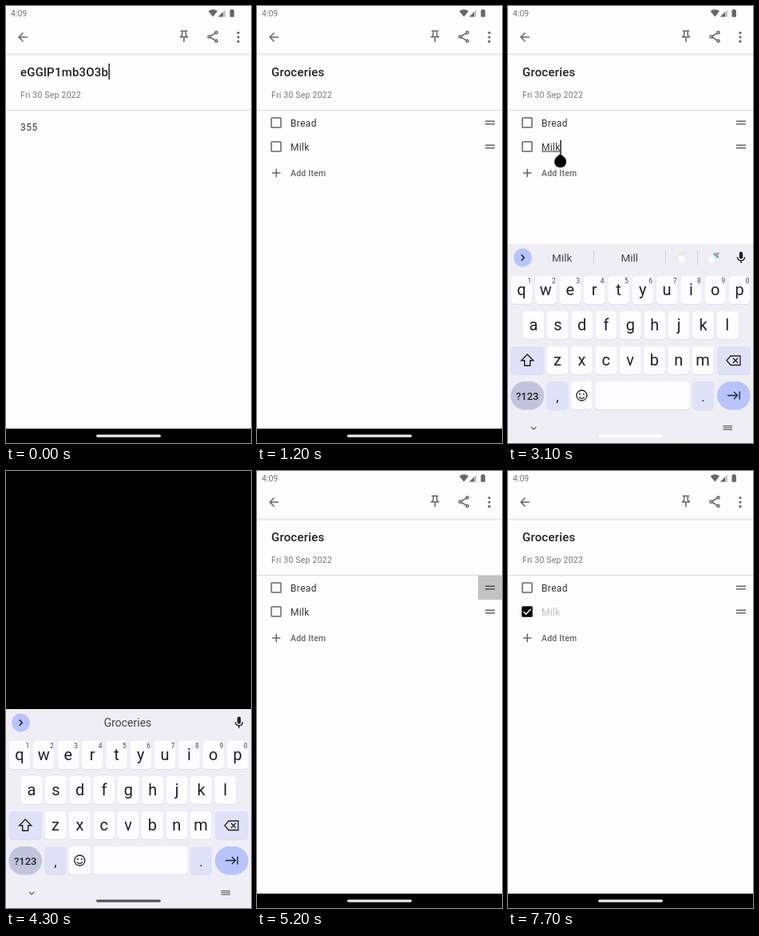
These frames come from a looping animation (307 by 547 pixels, 8 s). An HTML page:

```html
<!DOCTYPE html>
<html lang="en">
<head>
<meta charset="utf-8">
<title>Notes app walkthrough</title>
<style>
html, body { margin: 0; width: 100%; height: 100%; overflow: hidden; background: #000 }
svg { display: block; width: 307px; height: 547px; font-family: Roboto, sans-serif }
text { white-space: pre }
</style>
</head>
<body>
<svg id="stage" viewBox="0 0 307 547"></svg>
<script>
const stage = document.getElementById('stage');
const GREY = '#666', INK = '#333', PAPER = '#fdfdfd';
const KEYBOARD = '#f0eef5', KEY = '#fdfcff', TINT = '#dfe1f9', ACCENT = '#b6c4ff';

// Drawing helpers
const rect = (x, y, w, h, fill, r = 0, more = '') =>
  `<rect x="${x}" y="${y}" width="${w}" height="${h}" rx="${r}" fill="${fill}" ${more}/>`;
const circle = (x, y, r, fill, more = '') =>
  `<circle cx="${x}" cy="${y}" r="${r}" fill="${fill}" ${more}/>`;
const line = (d, stroke = GREY, width = 1.5) =>
  `<path d="${d}" fill="none" stroke="${stroke}" stroke-width="${width}"/>`;
const shape = (d, fill = GREY) => `<path d="${d}" fill="${fill}"/>`;
const text = (s, x, y, size, fill, { weight = 400, gap = 0, mid = false } = {}) =>
  `<text x="${x}" y="${y}" font-size="${size}" fill="${fill}" font-weight="${weight}"
    letter-spacing="${gap}" text-anchor="${mid ? 'middle' : 'start'}">${s}</text>`;
const at = (x, y, body, scale = 1) => `<g transform="translate(${x} ${y}) scale(${scale})">${body}</g>`;
// Icons use a 24 unit box centred on x, y
const icon = (x, y, body, scale = .747) => at(x - 12 * scale, y - 12 * scale, body, scale);
const ripple = (x, y) => circle(x, y, 15, '#000', 'opacity=".2"');
const pill = color => rect(113, 536.4, 81, 3.4, color, 1.7);

const backIcon = icon(21, 39, shape('M20 11H7.83l5.59-5.59L12 4l-8 8 8 8 1.41-1.41L7.83 13H20z'));
const pinIcon = icon(223, 38, shape('M14 4v5c0 1.12.37 2.16 1 3H9c.65-.86 1-1.9 1-3V4h4m3-2H7a1 1 0 0 0 0 2h1v5c0 1.66-1.34 3-3 3v2h5.97v7l1 1 1-1v-7H19v-2c-1.66 0-3-1.34-3-3V4h1a1 1 0 0 0 0-2z'));
const shareIcon = icon(259, 38.5, line('M8 11l8-5M8 13l8 5', GREY, 2) +
  [[18, 5], [6, 12], [18, 19]].map(([x, y]) => circle(x, y, 2.1, 'none', `stroke="${GREY}" stroke-width="2"`)).join(''));
const moreIcon = [33.6, 39, 44.4].map(y => circle(291, y, 1.6, GREY)).join('');

function statusBar() {
  return text('4:09', 6, 13.3, 10.5, '#757575') +
    shape('M253.6 6.6Q259.3 2 265 6.6L259.3 13.6z') +
    shape('M275 4.5v9h-9z', '#c4c4c4') + shape('M272 7.5v6h-6z') +
    rect(280.5, 5, 5.4, 8.7, GREY, .8) + rect(282, 4, 2.4, 1.5, GREY);
}

function page(toolbar) {
  return rect(0, 0, 307, 530, PAPER) + statusBar() + toolbar +
    rect(0, 59.5, 307, 1.2, '#e2e2e2') + rect(0, 60.7, 307, 1.3, '#f1f1f1');
}

function checkbox(x, y, on) {
  return on
    ? rect(x - 6.8, y - 6.8, 13.6, 13.6, '#000', 1.5) + line(`M${x - 4.4} ${y + .2}l3 3 6-6.4`, '#fff')
    : rect(x - 6, y - 6, 12, 12, 'none', .8, `stroke="${GREY}" stroke-width="1.5"`);
}

function item(label, y, on) {
  return checkbox(24, y, on) + text(label, 42, y + 5, 12, on ? '#bbb' : INK, { gap: .35 }) +
    line(`M286 ${y - 1.8}h12M286 ${y + 1.8}h12`);
}

function cursor(x, y, h) { return rect(x - .75, y, 1.5, h, '#222'); }

function dropHandle(x, y, alpha) {
  return `<g opacity="${alpha}">${shape(`M${x} ${y}l5.5 4.7a7.5 7.5 0 1 1-11 0z`, '#000')}</g>`;
}

function note(title, body) {
  return page(backIcon + pinIcon + shareIcon + moreIcon) +
    text(title, 18, 87.6, 15, '#222', { weight: 500, gap: .2 }) +
    text('Fri 30 Sep 2022', 18, 115.4, 10.5, '#777', { gap: .22 }) +
    rect(0, 130, 307, 1.2, '#dedede') + body;
}

function groceries(milkDone) {
  return note('Groceries', item('Bread', 146, false) + item('Milk', 176, milkDone) +
    line('M19 209h10.4M24.2 203.8v10.4') + text('Add Item', 42, 213.2, 10.5, GREY, { weight: 500, gap: .2 }));
}

function card(y, h, title, body) {
  return rect(6.5, y, 294, h, PAPER, 3, 'stroke="#ddd"') +
    text(title, 18, y + 21, 13, '#222', { weight: 500, gap: .2 }) +
    text('Fri 30 Sep 2022', 18, y + 39, 10.5, '#777', { gap: .22 }) + body;
}

function overview() {
  const rows = ['Bread', 'Milk'].map((s, i) =>
    checkbox(24, 204 + i * 20, false) + text(s, 38, 208 + i * 20, 11, INK, { gap: .3 })).join('');
  return page(line('M14.5 34.5h13.5M14.5 39h13.5M14.5 43.5h13.5') +
      text('Notes', 54, 44, 15, '#222', { weight: 500, gap: .2 }) +
      circle(282, 37.5, 4.2, 'none', `stroke="${GREY}" stroke-width="1.5"`) + line('M285 40.5l5 5')) +
    card(67, 72, 'eGGlP1mb3O3b', text('355', 18, 126, 11, INK, { gap: .3 })) +
    card(146, 94, 'Groceries', rows) +
    circle(274, 498, 22, '#000', 'opacity=".12"') + circle(274, 496, 21, '#111') +
    line('M268.5 496h11M274 490.5v11', '#fff');
}

function key(x, y, w, fill = KEY, r = 4.5) {
  return rect(x, y + .8, w, 35, '#d9d7df', r) + rect(x, y, w, 35, fill, r);
}

function keyRow(letters, x, y, digits) {
  return [...letters].map((c, i) => {
    const cx = x + i * 30.35;
    return key(cx - 13.3, y, 26.6) + text(c, cx, y + 23.6, 20, '#222', { mid: true }) +
      (digits ? text((i + 1) % 10, cx + 10, y + 9.2, 8.5, '#444', { mid: true }) : '');
  }).join('');
}

function suggestions(words) {
  if (words.length < 2) return words.map(w => text(w, 152.5, 320.4, 14, '#444', { mid: true })).join('');
  const milkGlass = shape('M213.5 308h9l-1 15h-7z', '#dfe6ea') + shape('M214 312h8l-.8 10h-6.4z', '#fff') +
    shape('M213.7 310h8.6l-.2 3h-8.2z', '#f1edcf');
  const bottle = `<g transform="rotate(45 258 315)">${rect(254.5, 312, 7, 11, '#e8eef0', 2)}${
    rect(254.5, 316, 7, 6, '#fff', 1.5)}${rect(254, 309.5, 8, 3, '#58aede', 1)}${rect(256, 306, 4, 4, '#e9a37c', 2)}</g>`;
  return words.map((w, i) => text(w, 67.7 + i * 84.5, 320.4, 13.5, '#444', { mid: true })).join('') +
    line('M107.5 306v18M197.5 306v18M237.5 306v18', '#d0ced6', 1) + milkGlass + bottle;
}

function keyboard(offset, words, pillColor) {
  const dots = [0, 1, 2].map(r => line(`M269.5 ${525.6 + r * 2.3}h11.5`, '#666', 1.2)).join('');
  return at(0, offset, rect(0, 298, 307, 249, KEYBOARD) +
    circle(18.5, 315, 11.4, ACCENT) + line('M16.7 311.4l3.6 3.6-3.6 3.6', '#223') + suggestions(words) +
    icon(292, 315, shape('M12 14a3 3 0 0 0 3-3V5a3 3 0 0 0-6 0v6a3 3 0 0 0 3 3zm5-3a5 5 0 0 1-10 0H5a7 7 0 0 0 6 6.9V21h2v-3.1A7 7 0 0 0 19 11z', '#222')) +
    keyRow('qwertyuiop', 17, 338, true) + keyRow('asdfghjkl', 32, 382) + keyRow('zxcvbnm', 62, 426) +
    key(3.5, 426, 41.5, TINT) + line('M24.2 436l7.5 7.7h-4v6.6h-7v-6.6h-4z', '#222', 1.4) +
    key(262, 426, 41.5, TINT) + line('M279 438h12v11.5h-12l-5-5.7zM282 440.8l6 6M288 440.8l-6 6', '#222', 1.3) +
    key(3.5, 470, 41.5, '#c2c3dc', 17.5) + text('?123', 24.2, 492.5, 13, '#222', { mid: true, weight: 500 }) +
    key(48.7, 470, 26.6, TINT) + text(',', 62, 495, 17, '#222', { mid: true }) +
    key(79, 470, 26.6) + circle(92.4, 487.5, 6.5, 'none', 'stroke="#222" stroke-width="1.3"') +
    circle(90, 485.7, 1, '#222') + circle(94.8, 485.7, 1, '#222') + line('M89 489.3q3.4 4 6.8 0', '#222', 1.3) +
    key(109.5, 470, 118) + key(231.3, 470, 26.6, TINT) + text('.', 244.6, 495, 17, '#222', { mid: true }) +
    key(262, 470, 41.5, ACCENT, 17.5) + line('M275 487.5h12M283 483l4.5 4.5-4.5 4.5M290.2 482.5v10', '#223', 1.4)) +
    rect(0, 530, 307, 17, KEYBOARD) + line('M29 526.8l3.2 3.2 3.2-3.2', '#555', 1.2) + dots + pill(pillColor);
}

const LIGHT = '#eee6ee', DARK = '#55545a';
const navBar = (color = LIGHT) => rect(0, 529, 307, 18, '#000') + pill(color);

// Editing the second item; the keyboard slides up as age grows
function editMilk(age) {
  const typing = age < 500;
  const handle = typing ? 1 : age < 600 ? .5 : 0;
  return groceries(false) + rect(42, 181.6, 24, 1, '#333') + (typing ? cursor(66, 168, 17) : '') +
    dropHandle(65.6, 185, handle) +
    keyboard(age < 100 ? 140 : 0, ['Milk', 'Mill'], age < 200 ? '#fff' : DARK);
}

function checking(age, done) {
  return groceries(done) + (age < 100 ? ripple(24, 176) : '');
}

function scene(t) {
  if (t < 300) return note('eGGlP1mb3O3b', text('355', 18, 156.4, 12, INK, { gap: .5 })) + cursor(129.2, 72, 20) + navBar();
  if (t < 400) return rect(0, 0, 307, 547, '#000') + navBar();
  if (t < 1200) return overview() + navBar();
  if (t < 1600) return groceries(false) + navBar();
  if (t < 2000) return editMilk(t - 1600);
  if (t < 2300) return checking(t - 2000, true) + keyboard((t - 2000) * 1.05, ['Milk', 'Mill'], DARK);
  if (t < 2600) return groceries(true) + navBar();
  if (t < 3000) return checking(t - 2600, false) + navBar();
  if (t < 3800) return editMilk(t - 3000);
  if (t < 4200) return groceries(false) + cursor(85.5, 72, 20) + dropHandle(85.5, 92, 1) +
    keyboard(0, t < 3900 ? [] : ['Groceries'], DARK);
  if (t < 4300) return groceries(false) + ripple(21, 39) + keyboard(0, ['Groceries'], DARK);
  if (t < 4400) return rect(0, 0, 307, 547, '#000') + keyboard(0, ['Groceries'], DARK);
  if (t < 4600) return overview() + navBar('#8a868c');
  if (t < 7600) {
    // Each drag handle press lasts one step and repeats every 400 ms
    const pressed = t >= 5200 && (t - 5200) % 400 < 100;
    return groceries(false) + navBar(t < 4700 ? '#bbb5bb' : LIGHT) +
      (pressed ? rect(277, t < 5600 ? 131 : 161, 30, 30, '#000', 0, 'opacity=".235"') : '');
  }
  return checking(t - 7600, true) + navBar();
}

let shown = -1;
const start = performance.now();
function tick() {
  const step = Math.floor((performance.now() - start) % 8000 / 100) * 100;
  if (step !== shown) stage.innerHTML = scene(shown = step);
  requestAnimationFrame(tick);
}
tick();
</script>
</body>
</html>
```
